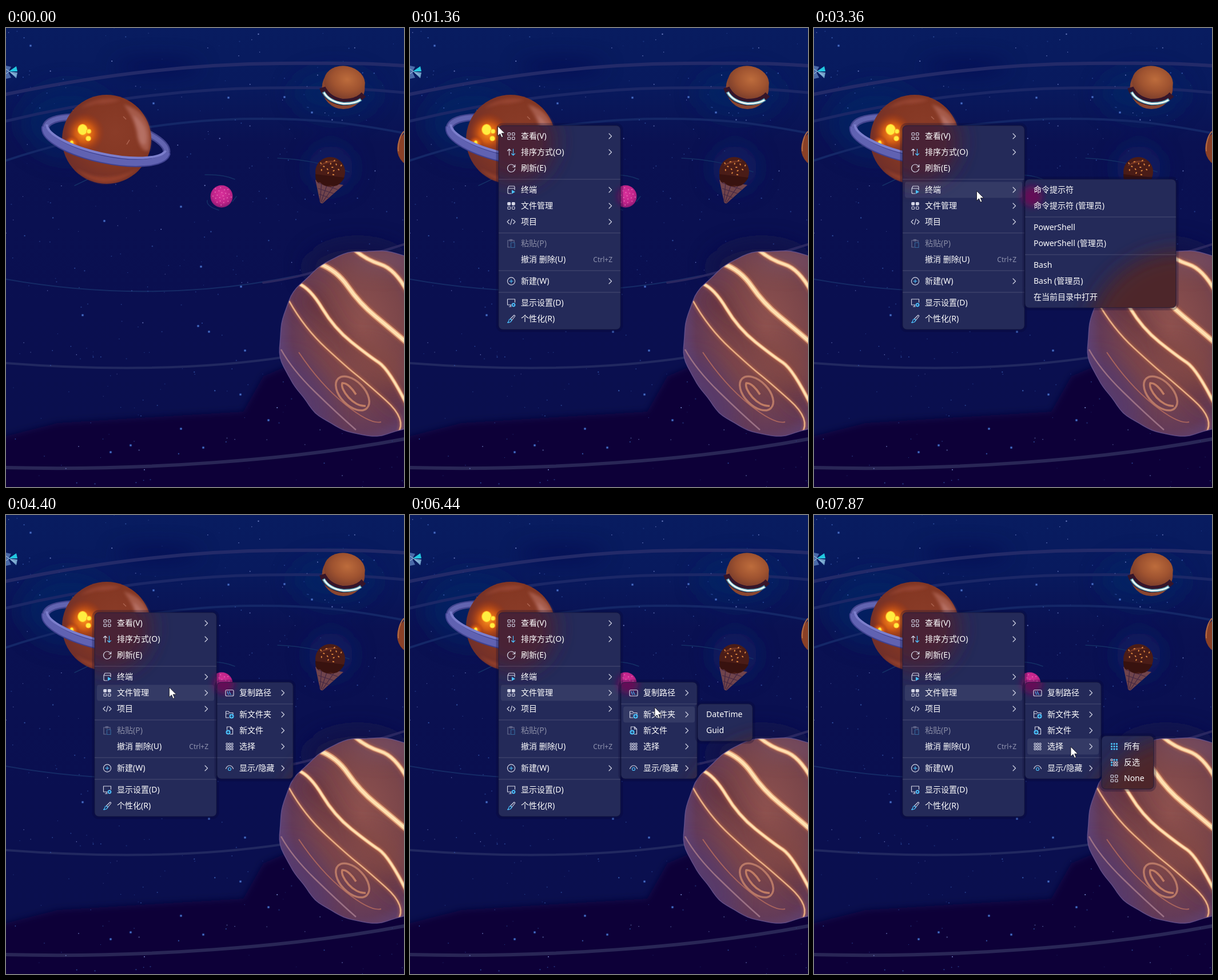
An HTML page for the animation above (8000 ms loop, 696 by 804 pixels).

```html
<!DOCTYPE html>
<html lang="zh-CN">
<head>
<meta charset="utf-8">
<title>Context menu</title>
<style>
html,body{margin:0;width:100%;height:100%;overflow:hidden;background:#0a1050}
svg{display:block;width:100%;height:100%}
text{font:14px "Noto Sans","Noto Sans CJK SC","Noto Sans CJK",sans-serif;fill:#fff;white-space:pre}
.hint{font-size:12px;fill:#9094b0}
.ln{fill:none;stroke:#d4d6e6;stroke-width:1.15;stroke-linecap:round;stroke-linejoin:round}
.b{stroke:#4cc2ff}
.f{fill:#4cc2ff;stroke:none}
.orbit{fill:none;stroke-linecap:round}
</style>
</head>
<body>
<svg id="stage" viewBox="0 0 696 804" xmlns="http://www.w3.org/2000/svg">
<defs>
  <linearGradient id="sky" x2="0" y2="1">
    <stop offset="0" stop-color="#081c60"/><stop offset=".12" stop-color="#081a5e"/>
    <stop offset=".25" stop-color="#0a1152"/><stop offset=".6" stop-color="#0a0f50"/>
    <stop offset="1" stop-color="#0a0f4d"/>
  </linearGradient>
  <radialGradient id="rock" cx=".6" cy=".42" r=".62">
    <stop offset="0" stop-color="#8a3c28"/><stop offset=".6" stop-color="#843723"/>
    <stop offset="1" stop-color="#702f2a"/>
  </radialGradient>
  <radialGradient id="lava">
    <stop offset="0" stop-color="#ff9a20"/><stop offset=".45" stop-color="#e46410" stop-opacity=".8"/>
    <stop offset="1" stop-color="#a03010" stop-opacity="0"/>
  </radialGradient>
  <radialGradient id="bun" cx=".55" cy=".4" r=".6">
    <stop offset="0" stop-color="#bd6c3c"/><stop offset=".6" stop-color="#9f5330"/>
    <stop offset="1" stop-color="#7e3f2c"/>
  </radialGradient>
  <radialGradient id="berry" cx=".5" cy=".4" r=".6">
    <stop offset="0" stop-color="#d8309a"/><stop offset=".65" stop-color="#c0248a"/>
    <stop offset="1" stop-color="#8c1a74"/>
  </radialGradient>
  <radialGradient id="giant" cx=".66" cy=".42" r=".68">
    <stop offset="0" stop-color="#8f524f"/><stop offset=".45" stop-color="#7b464a"/>
    <stop offset=".78" stop-color="#643b58"/><stop offset="1" stop-color="#5c4684"/>
  </radialGradient>
  <filter id="soft" x="-60%" y="-60%" width="220%" height="220%"><feGaussianBlur stdDeviation="18"/></filter>
  <filter id="mid" x="-60%" y="-60%" width="220%" height="220%"><feGaussianBlur stdDeviation="6"/></filter>
  <filter id="glint" x="-20%" y="-20%" width="140%" height="140%"><feGaussianBlur stdDeviation="2.500"/></filter>
  <clipPath id="ball"><path id="disc"/></clipPath>
  <g id="glow">
    <circle cx="182" cy="200" r="72" fill="#4a2236" filter="url(#soft)"/>
    <circle cx="381" cy="295" r="18" fill="#641056" filter="url(#mid)"/>
    <circle cx="640" cy="552" r="162" fill="#4d2529" filter="url(#soft)"/>
    <ellipse cx="555" cy="705" rx="90" ry="42" fill="#33244f" filter="url(#soft)"/>
  </g>
</defs>

<rect width="696" height="804" fill="url(#sky)"/>
<g filter="url(#soft)">
  <ellipse cx="110" cy="165" rx="85" ry="65" fill="#0b2468" opacity=".6"/>
  <ellipse cx="568" cy="245" rx="40" ry="40" fill="#0a2468" opacity=".7"/>
  <ellipse cx="575" cy="115" rx="75" ry="42" fill="#0a2468" opacity=".6"/>
  <ellipse cx="265" cy="68" rx="75" ry="9" fill="#0a124a" opacity=".8"/>
  <ellipse cx="615" cy="420" rx="90" ry="45" fill="#191448"/>
</g>
<path d="M-40 725L90 692 250 682 415 672 450 610 520 580H740V850H-40Z" fill="#0c0639" filter="url(#mid)"/>
<g class="orbit">
  <path d="M0 116C150 85 310 63 480 62S640 63 696 66" stroke="#232a69" stroke-width="6"/>
  <path d="M0 163C150 127 310 107 450 105S620 107 696 113" stroke="#1b2767" stroke-width="5"/>
  <path d="M0 232C150 182 310 160 430 159S610 168 696 184" stroke="#142767" stroke-width="4"/>
  <path d="M0 440C130 463 250 465 350 457S580 425 696 379" stroke="#152a66" stroke-width="2.2"/>
  <path d="M450 446Q500 439 540 427T696 379" stroke="#2a2760" stroke-width="4"/>
  <path d="M0 587C170 600 340 599 490 576" stroke="#212860" stroke-width="4"/>
  <path d="M0 770C240 776 500 757 696 720" stroke="#292656" stroke-width="6"/>
  <path d="M348 257Q380 256 400 265M352 302Q350 312 372 319M396 304L403 295M475 228Q535 230 600 252M120 276L164 255" stroke="#143066" stroke-width="1.5"/>
</g>
<g id="stars"></g>

<g>
  <path d="M0 66L9 68 4 77 9 87 0 89Z" fill="#4a6aa8"/>
  <path d="M5 76L18 67 20 76Z" fill="#22c8e0"/><path d="M5 76L20 78 18 88Z" fill="#6fa0c8"/>
  <path d="M0 72L6 76 0 80M8 78L17 83" stroke="#a8c8e8" fill="none"/>
</g>

<g>
  <g transform="translate(175 196) rotate(12)" fill="none">
    <ellipse rx="108" ry="34" stroke="#43458f" stroke-width="13"/>
    <ellipse rx="108" ry="34" stroke="#6264b0" stroke-width="8"/>
  </g>
  <circle cx="176" cy="195" r="78" fill="url(#rock)"/>
  <g filter="url(#glint)">
    <path d="M206 134Q262 150 250 214Q236 220 229 190Q226 162 206 134Z" fill="#a55a4a"/>
    <path d="M222 152Q252 172 244 204Q232 206 231 182Z" fill="#b57064"/>
    <path d="M130 140Q165 118 200 126Q178 134 160 132Z" fill="#964530"/>
    <path d="M122 246Q170 276 232 246Q200 272 168 271Q140 266 122 246Z" fill="#94412c"/>
  </g>
  <path d="M205 155l5 5M216 196l-5 8" stroke="#bb7260" fill="none" stroke-width="1.5" opacity=".7"/>
  <circle cx="137" cy="184" r="36" fill="url(#lava)"/><circle cx="115" cy="202" r="14" fill="url(#lava)"/>
  <g fill="#ffee40" stroke="#ffa420" stroke-width="1.2">
    <ellipse cx="134" cy="178" rx="8.5" ry="9.5"/><circle cx="145" cy="181" r="4"/>
    <circle cx="144" cy="193.500" r="4.500"/><ellipse cx="115" cy="201.500" rx="3" ry="4.500"/>
  </g>
  <g transform="translate(175 196) rotate(12)" fill="none">
    <path d="M108 0A108 34 0 0 1-108 0" stroke="#3f4190" stroke-width="15"/>
    <path d="M108 0A108 34 0 0 1-108 0" stroke="#6062b2" stroke-width="11"/>
    <path d="M106-3A107 32 0 0 1-107-5" stroke="#7c7ecc" stroke-width="4"/>
  </g>
</g>

<g id="fruit"><circle cx="377" cy="295" r="19.500" fill="url(#berry)"/></g>

<g>
  <circle cx="590" cy="104.500" r="37.500" fill="#8a4630"/>
  <path d="M554 104Q560 125 588 130 610 131 625 116" fill="none" stroke="#35152a" stroke-width="12"/>
  <path d="M555 112Q564 129 590 132.500 611 133 621 125" fill="none" stroke="#4a8ea8" stroke-width="5.500"/>
  <path d="M556 113Q565 129 590 132.500 609 133 620 126" fill="none" stroke="#e6f6f2" stroke-width="3"/>
  <ellipse cx="592" cy="95" rx="36" ry="28.500" transform="rotate(10 592 95)" fill="url(#bun)"/>
</g>

<g>
  <path d="M541 266L590 275 554 307Q550 308 549 304Z" fill="#70444c"/>
  <path d="M545 271L580 283M546 281L573 290M548 291L564 297M552 270L549 304M562 273L551 305M574 276L553 306" stroke="#452842" stroke-width="1.3"/>
  <circle cx="567" cy="252" r="26" fill="#4a1c17"/>
  <path d="M541 256Q541 274 550 270 558 280 568 275 580 282 592 262Z" fill="#38120f"/>
  <path d="M548 242Q560 228 582 234Q566 234 548 242Z" fill="#713322"/>
  <g id="sprinkles"></g>
</g>

<circle cx="718" cy="211" r="34" fill="#8a4026"/>
<path d="M696 181Q685 193 686 216" fill="none" stroke="#b26a45" stroke-width="2"/>

<g clip-path="url(#ball)">
  <rect x="470" y="380" width="230" height="340" fill="url(#giant)"/>
  <g filter="url(#soft)" opacity=".75">
    <path d="M500 470Q560 520 690 680L690 640Q590 560 540 455Z" fill="#5c2c38"/>
    <ellipse cx="655" cy="590" rx="55" ry="28" transform="rotate(40 655 590)" fill="#844a44"/>
    <ellipse cx="520" cy="640" rx="36" ry="75" transform="rotate(-35 520 640)" fill="#543a70"/>
    <ellipse cx="660" cy="408" rx="60" ry="14" fill="#7c566c"/>
  </g>
  <g id="stripes"></g>
  <g fill="none" stroke="#a9645c">
    <path d="M512 568Q550 625 594 660T656 690" stroke-width="2"/>
    <path d="M481 563Q500 598 540 637T612 704" stroke="#9b7084" stroke-width="2.500"/>
    <ellipse cx="606" cy="640" rx="36" ry="21" transform="rotate(46 606 640)" stroke="#b87866" stroke-width="3.500"/>
    <path d="M629 662C608 664 584 634 588 622 596 621 606 632 612 642" stroke="#c07c64" stroke-width="3.500"/>
  </g>
</g>
<use href="#disc" fill="none" stroke="#6a5590" stroke-width="1.5" opacity=".8"/>

<g id="menus"></g>
<path id="cursor" d="M0 0V17L4 13.300 6.700 19.500 9.300 18.400 6.700 12.300H12.300Z" fill="#fff" stroke="#101018" stroke-width=".8" stroke-linejoin="round"/>
</svg>

<script>
const $ = id => document.getElementById(id);
const LOOP = 8000, FADE = 75, ROW = 28, GAP = 10, EDGE = 18.5;
const clamp = v => Math.max(0, Math.min(1, v));

// ---------- scenery ----------
let seed = 11;
const rnd = () => (seed = (seed * 16807) % 2147483647) / 2147483647;
const dot = (x, y, r, fill, o = 1) =>
  `<circle cx="${x.toFixed(1)}" cy="${y.toFixed(1)}" r="${r.toFixed(2)}" fill="${fill}" opacity="${o.toFixed(2)}"/>`;

// n points spread evenly over an ellipse
const spread = (n, cx, cy, rx, ry) => Array.from({ length: n }, (_, i) => {
  const r = Math.sqrt((i + .5) / n), a = i * 2.4;
  return [cx + rx * r * Math.cos(a), cy + ry * r * Math.sin(a)];
});

function drawScenery() {
  let s = '';
  for (let i = 0; i < 330; i++)
    s += dot(rnd() * 696, rnd() * 804, .5 + rnd() * .7, rnd() < .25 ? '#7c8cd0' : '#3456a8', .35 + rnd() * .6);
  const big = [[258,132],[43,31],[172,338],[306,313],[341,418],[411,453],[410,642],[459,687],[336,522],
    [355,532],[183,743],[306,702],[389,122],[487,121],[535,148],[134,503],[218,731],[345,735],[418,565]];
  for (const [x, y] of big) s += dot(x, y, 2.3, '#2c4ea4', .85) + dot(x, y, 1, '#5f80d0');
  $('stars').innerHTML = s;

  $('fruit').innerHTML += spread(22, 377, 294, 17, 17).map(([x, y]) => dot(x, y, 1, '#ff9cd0', .6)).join('');
  $('sprinkles').innerHTML = spread(14, 567, 244, 20, 15).map(([x, y], i) =>
    `<rect x="-1.7" y="-1" width="3.4" height="2" rx="1" fill="#dc8640" transform="translate(${x} ${y}) rotate(${i * 50})"/>`).join('');

  // slightly bumpy circle, flattened at its lower left
  let d = '';
  for (let i = 0; i < 120; i++) {
    const a = i * Math.PI / 60, flat = 8 * Math.exp(-(((a - 2.45) / .4) ** 2));
    const r = 162 - flat + 1.2 * Math.sin(a * 9) + .8 * Math.sin(a * 17 + 1);
    d += (i ? 'L' : 'M') + (640 + r * Math.cos(a)).toFixed(1) + ' ' + (551.5 + r * Math.sin(a)).toFixed(1);
  }
  $('disc').setAttribute('d', d + 'Z');

  const lines = [
    ['M610 389Q630 406 655 414T702 462', 8],
    ['M548 413Q578 424 598 453T646 505 704 554', 10],
    ['M512 448Q532 456 553 491T604 550 652 586 702 662', 6.5],
    ['M495 478Q522 526 560 561T612 607 664 652 685 710', 2.8]];
  $('stripes').innerHTML = lines.map(([p, w]) =>
    `<g fill="none"><path d="${p}" stroke="#c8704c" stroke-width="${w + 2}" opacity=".6" filter="url(#glint)"/>` +
    `<path d="${p}" stroke="#dc9a74" stroke-width="${w}"/>` +
    `<path d="${p}" stroke="#ffe0b0" stroke-width="${w * .6}" opacity="${w > 4 ? 1 : .3}"/></g>`).join('');
}

// ---------- icons, centred on 0,0 ----------
const sq = (x, y, s, cls = '') => `<rect class="${cls}" x="${x}" y="${y}" width="${s}" height="${s}" rx="1"/>`;
const plus = (x, y) => `<circle class="f" cx="${x}" cy="${y}" r="4"/><path d="M${x - 2} ${y}h4M${x} ${y - 2}v4" stroke="#1c2450"/>`;
const grid = hot => {
  let s = '';
  for (const x of [-6, -1.5, 3]) for (const y of [-6, -1.5, 3]) s += sq(x, y, 3, hot(x, y) ? 'f' : '');
  return s;
};
const quad = sq(-6, -6, 4.5) + sq(1.5, -6, 4.5) + sq(-6, 1.5, 4.5) + sq(1.5, 1.5, 4.5);
const ICONS = {
  view: quad,
  sort: '<path d="M-3.500 5.500v-11l-3 3m3-3l3 3"/><path class="b" d="M3.500-5.500v11l-3-3m3 3l3-3"/>',
  refresh: '<path d="M6.300-2A6.600 6.600 0 1 0 6.600 1M6.800-6v4H2.800"/>',
  term: '<path d="M0 6.500H-4Q-6 6.500-6 4.500V-2.500H6V0M-6-2.500L-4-6.500H4.500Q6.500-6.500 6-2.500"/><path class="f" d="M1 0L7 3.500 1 7Z"/>',
  files: `<rect x="-6" y="-6" width="4.500" height="4.500" rx="1" fill="#d4d6e6"/>${quad}<rect x="1.500" y="-6" width="4.500" height="4.500" rx="1" fill="#d4d6e6"/>`,
  code: '<path d="M-3.500-3.500L-7 0-3.500 3.500M3.500-3.500L7 0 3.500 3.500M1.500-5L-1.500 5"/>',
  paste: '<path d="M-2 6.500H-6V-5.500H5V-2M-2.500-7h4v2.500h-4z"/><path class="b" d="M-.5-1.500H6V7H-.5Z"/>',
  add: '<circle r="6.600"/><path class="b" d="M-3 0H3M0-3V3"/>',
  display: '<path d="M0 3.500H-6.500V-6.500H6.500V-1M-3.500 6.500H0M-1 3.500V6.500"/><circle class="b" cx="4" cy="3.500" r="2.400" stroke-width="2" stroke-dasharray="1.500 .4"/>',
  brush: '<path d="M-1.500 0L5-6.500Q7-6.500 6.500-4.500L1 2.500Z"/><path class="b" d="M-1.500 0L1 2.500Q-1 7-6.500 6.500-4 5-4 2.500-3.500 .500-1.500 0Z"/>',
  path: '<rect x="-7" y="-5" width="14" height="10.500" rx="2"/><path class="b" d="M-4-2.500L-2 3M-.5-2.500L1.500 3M4 3h.1"/>',
  folder: `<path d="M-1 5.500H-6.500V-5.500H-2L0-3H6V-1M-6.500-1.500H-1"/>${plus(3.5, 3)}`,
  file: `<path d="M-4.500-1.500V-6.500H1.500L5.500-2.500V6.500H1M1.500-6.500V-2.500H5.500"/>${plus(-2.5, 3)}`,
  pick: grid(() => false),
  eye: '<path d="M-6.500 1Q-4.500-4.500 0-4.500T6.500 1"/><circle class="b" cy="1.500" r="2.500"/>',
  all: grid(() => true),
  invert: grid((x, y) => (x > -5) !== (y > -5)),
  none: quad
};

// ---------- menus: '-' is a separator, rows are [label, icon, options] ----------
const user = 'qingmulan';
const paths = (...tail) => ['/', '\\\\', '\\'].map(s => [['C:', 'Users', user, ...tail].join(s)]);
const sub = { more: 1 };

const MENUS = [
  { x: 155, y: 171, w: 213, from: 1260, to: LOOP, icons: 1, rows: [
    ['查看(V)', 'view', sub], ['排序方式(O)', 'sort', sub], ['刷新(E)', 'refresh'], '-',
    ['终端', 'term', sub], ['文件管理', 'files', sub], ['项目', 'code', sub], '-',
    ['粘贴(P)', 'paste', { dim: 1 }], ['撤消 删除(U)', '', { hint: 'Ctrl+Z' }], '-',
    ['新建(W)', 'add', sub], '-', ['显示设置(D)', 'display'], ['个性化(R)', 'brush']] },
  { x: 369, y: 199, w: 86, from: 2445, to: 2800, of: [0, 1],
    rows: [['名称'], ['大小'], ['项目类型'], ['修改日期']] },
  { x: 369, y: 265, w: 264, from: 2810, to: 4300, of: [0, 3], rows: [
    ['命令提示符'], ['命令提示符 (管理员)'], '-', ['PowerShell'], ['PowerShell (管理员)'], '-',
    ['Bash'], ['Bash (管理员)'], ['在当前目录中打开']] },
  { x: 369, y: 293, w: 133, from: 4310, to: LOOP, of: [0, 4], icons: 1, rows: [
    ['复制路径', 'path', sub], '-', ['新文件夹', 'folder', sub], ['新文件', 'file', sub],
    ['选择', 'pick', sub], '-', ['显示/隐藏', 'eye', sub]] },
  { x: 503, y: 293, w: 215, from: 5050, to: 5818, of: [3, 0],
    rows: [...paths('Desktop'), '-', ...paths()] },
  { x: 503, y: 331, w: 96, from: 5818, to: 6770, of: [3, 1], rows: [['DateTime'], ['Guid']] },
  { x: 503, y: 359, w: 125, from: 6775, to: 7780, of: [3, 2], rows: [
    ['H'], ['CPP'], ['CMakeLists.txt'], '-', ['PY'], '-', ['JAVA'], '-',
    ['TXT'], ['MD'], ['HTML'], ['JSON'], ['INI'], ['XML']] },
  { x: 503, y: 387, w: 91, from: 7785, to: LOOP, of: [3, 3], icons: 1,
    rows: [['所有', 'all'], ['反选', 'invert'], ['None', 'none']] }
];

function buildMenu(m, i) {
  const { x, y, w } = m, tx = x + (m.icons ? 39 : 15);
  let cy = y + EDGE, body = '';
  m.mids = [];
  for (const row of m.rows) {
    if (row === '-') {
      body += `<path d="M${x} ${cy - 8.5}h${w}" stroke="#fff" opacity=".16"/>`;
      cy += GAP;
      continue;
    }
    const [label, icon, o = {}] = row;
    if (icon) body += `<g class="ln" transform="translate(${x + 22} ${cy})" opacity="${o.dim ? .4 : 1}">${ICONS[icon]}</g>`;
    body += `<text x="${tx}" y="${cy + 4.5}" opacity="${o.dim ? .45 : 1}">${label}</text>`;
    if (o.hint) body += `<text class="hint" x="${x + w - 14}" y="${cy + 4}" text-anchor="end">${o.hint}</text>`;
    if (o.more) body += `<path class="ln" d="M${x + w - 20} ${cy - 4.5}l4.500 4.500-4.500 4.500"/>`;
    m.mids.push(cy);
    cy += ROW;
  }
  m.h = cy - ROW + EDGE - y;
  const box = `x="${x}" y="${y}" width="${w}" height="${m.h}" rx="7"`;
  return `<g id="m${i}"><clipPath id="c${i}"><rect ${box}/></clipPath>
    <rect ${box} fill="none" stroke="#080a34" stroke-width="9" opacity=".28"/>
    <g clip-path="url(#c${i})"><rect ${box} fill="#242a59"/><use href="#glow"/></g>
    <rect ${box} fill="none" stroke="#171a3c" opacity=".75"/>
    <rect id="h${i}" x="${x + 4}" width="${w - 8}" height="${ROW}" rx="4" fill="#fff" fill-opacity=".075"/>${body}</g>`;
}

// ---------- pointer path: time, x, y ----------
const TRACK = [[180,266,804],[640,153.5,172],[1770,153.5,172],[2430,262,215],[2580,262,215],[2660,265.5,217],
  [2800,283,286],[3320,283,286],[3360,284.5,285.5],[4120,284.5,285.5],[4290,285.5,302],[4820,285.5,302],
  [5030,411,313],[5480,411,313],[5520,416,314],[5670,416,314],[5770,428,337],[6440,428,337],[6490,432,347],
  [6630,432,347],[6760,440.5,365],[7620,440.5,365],[7760,449,406],[LOOP,449,406]];

function pointer(t) {
  const i = TRACK.findIndex(k => k[0] > t);
  if (i < 1) return null;
  const [t0, x0, y0] = TRACK[i - 1], [t1, x1, y1] = TRACK[i];
  const u = (t - t0) / (t1 - t0), e = u * u * (3 - 2 * u);
  return [x0 + (x1 - x0) * e, y0 + (y1 - y0) * e];
}

function draw(t) {
  const p = pointer(t);
  $('cursor').style.display = p ? '' : 'none';
  if (p) $('cursor').setAttribute('transform', `translate(${p[0]} ${p[1]})`);
  const open = MENUS.filter(m => t >= m.from && t < m.to);
  MENUS.forEach((m, i) => {
    const shown = open.includes(m);
    $('m' + i).style.display = shown ? '' : 'none';
    if (!shown) return;
    $('m' + i).setAttribute('opacity', clamp((t - m.from) / FADE));
    let hot = -1;
    if (p && p[0] > m.x + 4 && p[0] < m.x + m.w - 4)
      hot = m.mids.findIndex(c => Math.abs(p[1] - c) <= ROW / 2);
    if (hot < 0) {
      const child = open.find(c => c.of && c.of[0] === i);
      if (child) hot = child.of[1];
    }
    $('h' + i).style.display = hot < 0 ? 'none' : '';
    if (hot >= 0) $('h' + i).setAttribute('y', m.mids[hot] - ROW / 2);
  });
}

drawScenery();
$('menus').innerHTML = MENUS.map(buildMenu).join('');
const start = performance.now();
function tick() {
  draw((performance.now() - start) % LOOP);
  requestAnimationFrame(tick);
}
tick();
</script>
</body>
</html>
```
